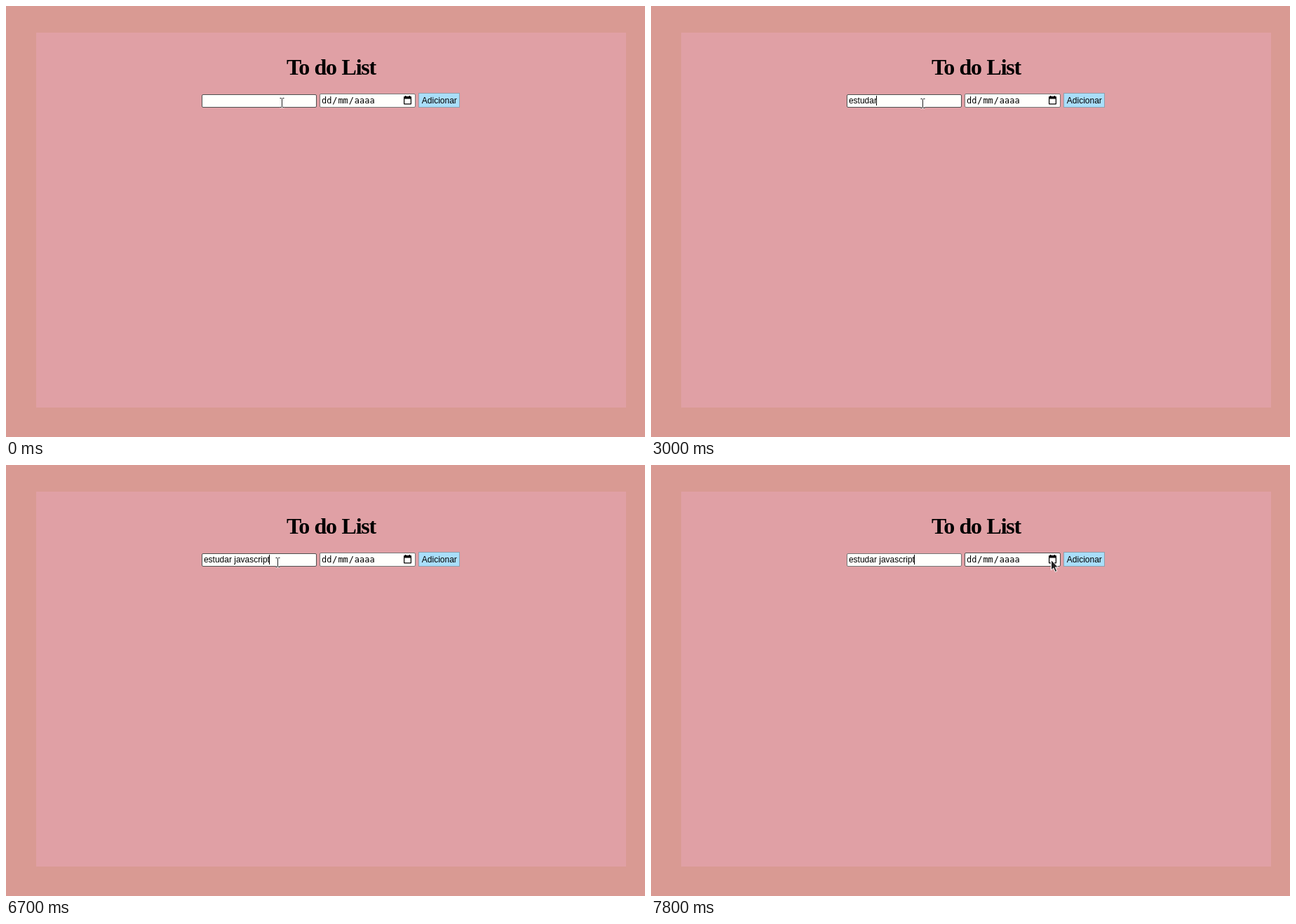
An HTML page that plays this animation: 911 px wide and 615 px high, repeating every 8000 ms.

```html
<!DOCTYPE html>
<html lang="pt-BR">
<head>
<meta charset="utf-8">
<title>To do List</title>
<style>
  html, body { margin: 0; width: 100%; height: 100%; overflow: hidden; background: #d99a93; }
  svg { display: block; }
  text { white-space: pre; font: 12px "Liberation Sans", Arial, sans-serif; }
  .title text { font: bold 32px "Liberation Serif", "Times New Roman", serif; letter-spacing: -1.2px; }
  .date text { font: 12px "DejaVu Sans Mono", monospace; }
  .field { fill: #fffffc; stroke: #767676; }
  .field.hover { stroke: #4f4f4f; }
</style>
</head>
<body>
<svg width="911" height="615" viewBox="0 0 911 615">
  <rect x="43" y="38" width="841" height="535" fill="#e0a0a5"/>
  <g class="title">
    <text x="400" y="98">To</text>
    <text x="439.5" y="98">do</text>
    <text x="478.5" y="98">List</text>
  </g>

  <rect id="taskField" class="field" x="279.5" y="126.5" width="163" height="18" rx="1.5"/>
  <text id="task" x="281.9" y="139"></text>
  <rect id="caret" y="128" width="1" height="14"/>

  <g class="date">
    <rect id="dateField" class="field" x="447.5" y="125.5" width="136" height="19" rx="1.5"/>
    <text x="450" y="139">dd</text>
    <text x="465.3" y="139">/</text>
    <text x="473.4" y="139">mm</text>
    <text x="488.7" y="139">/</text>
    <text x="496.8" y="139">aaaa</text>
    <path d="M567 130a1 1 0 0 1 1-1h1v-1h1.5v1h4v-1h1.5v1h1a1 1 0 0 1 1 1v9.500a1 1 0 0 1-1 1h-9a1 1 0 0 1-1-1zM568.200 132.500v6.800h8.600v-6.800z" fill-rule="evenodd"/>
  </g>

  <rect x="588.5" y="124.5" width="58" height="20" fill="#a9defa" stroke="#8fa0ad"/>
  <text x="592.8" y="139">Adicionar</text>

  <g id="beam" fill="none">
    <path d="M-2.500-6.500H-.5L.5-5.500 1.500-6.500H3.500M.5-5.500V5.500M-2.500 6.500H-.5L.5 5.500 1.500 6.500H3.500" stroke="#fff" stroke-width="2.600" opacity=".75"/>
    <path d="M-2.500-6.500H-.5L.5-5.500 1.500-6.500H3.500M.5-5.500V5.500M-2.500 6.500H-.5L.5 5.500 1.500 6.500H3.500" stroke="#222"/>
  </g>
  <path id="arrow" d="M.5.5V15L3.800 12 6.300 17.500 8.800 16.400 6.400 11H10.500Z" fill="#222" stroke="#fff"/>
</svg>
<script>
const $ = id => document.getElementById(id);
const LOOP = 8000;
const PHRASE = "estudar javascript";

// [time, letters typed]
const typing = [[1900, 1], [2000, 2], [2200, 3], [2400, 4], [2500, 5], [2800, 6],
  [3000, 7], [3200, 8], [3600, 9], [3800, 10], [4200, 12], [4400, 13],
  [4600, 14], [4800, 15], [5300, 16], [5500, 18]];

// [from, to] spans in which the caret is lit
const caretSpans = [[800, 1400], [1900, 6100], [6700, 7300], [7800, LOOP]];

// [time, x, y] pointer stops
const pointer = [[0, 393, 138], [100, 390, 138], [400, 387, 139], [6800, 387, 139],
  [6900, 420, 140], [7000, 464, 142], [7100, 496, 142], [7800, 570, 135]];

const lastBefore = (list, t) => list.filter(([at]) => at <= t).pop();

function pointerAt(t) {
  const [t0, x0, y0] = lastBefore(pointer, t);
  const next = pointer.find(([at]) => at > t);
  if (t < 6800 || !next) return [x0, y0];
  const k = (t - t0) / (next[0] - t0);
  const eased = 1 - (1 - k) ** 1.5;
  return [x0 + (next[1] - x0) * eased, y0 + (next[2] - y0) * eased].map(Math.round);
}

const show = (el, on) => el.setAttribute("visibility", on ? "visible" : "hidden");

function draw() {
  const t = Math.floor(performance.now() % LOOP / 100) * 100;

  const typed = lastBefore(typing, t);
  const task = $("task");
  task.textContent = PHRASE.slice(0, typed ? typed[1] : 0);
  $("caret").setAttribute("x", Math.floor(282 + task.getComputedTextLength() - .1));
  show($("caret"), caretSpans.some(([from, to]) => t >= from && t < to));

  const overTask = t < 7000;
  $("taskField").classList.toggle("hover", overTask);
  $("dateField").classList.toggle("hover", t >= 7200);
  const cursor = overTask ? $("beam") : $("arrow");
  cursor.setAttribute("transform", `translate(${pointerAt(t)})`);
  show($("beam"), overTask);
  show($("arrow"), !overTask);

  requestAnimationFrame(draw);
}
draw();
</script>
</body>
</html>
```
